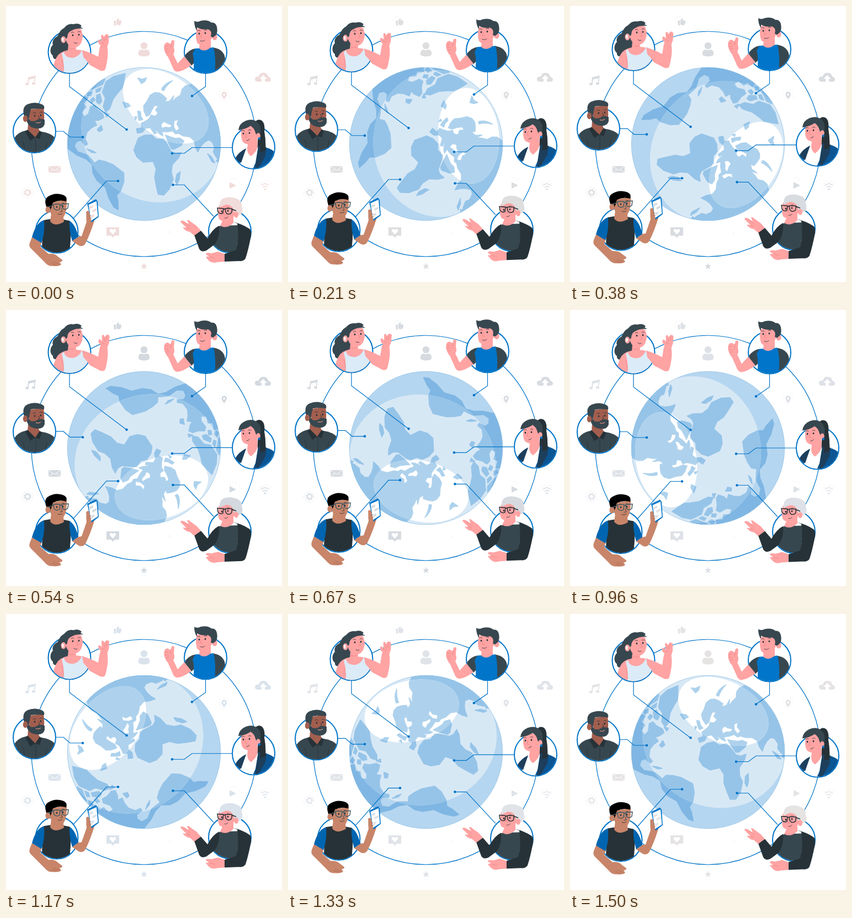
Recreate the animation shown at these times as an HTML page. Size 500 px wide and 500 px high, loop 1540 ms.

```html
<!DOCTYPE html>
<html lang="en">
<head>
<meta charset="utf-8">
<title>Connected world</title>
<style>
html,body{margin:0;width:100%;height:100%;overflow:hidden;background:#fff}
svg{display:block;width:100vw;height:100vh;--tint:#e0e0e0}
.line{fill:none;stroke:#0075c9;stroke-width:1.2}
.ring{fill:#fff;stroke:#0075c9;stroke-width:2}
.blue{fill:#0075c9}
.dark{fill:#37474f}
.ink{fill:#263238}
.pink{fill:#ffa3a3}
.tan{fill:#c8856a}
.brown{fill:#a25e4e}
.tint{fill:var(--tint)}
.thin{fill:none;stroke:#263238;stroke-width:.8;stroke-linecap:round}
.fold{fill:none;stroke:#e98585;stroke-width:.8;stroke-linecap:round}
.white{fill:#fff}
.spark{fill:none;stroke:var(--tint);stroke-width:1.2;stroke-linecap:round;stroke-dasharray:.1 5}
</style>
</head>
<body>
<svg viewBox="0 0 500 500">
<defs>
  <path id="bowl" d="M-37.7 0A37.7 37.7 0 0 0 37.7 0V-75H-37.7Z"/>
  <clipPath id="c1"><use href="#bowl" x="115" y="83.5"/></clipPath>
  <clipPath id="c2"><use href="#bowl" x="361.5" y="83.5"/></clipPath>
  <clipPath id="c3"><use href="#bowl" x="51.5" y="227.5"/></clipPath>
  <clipPath id="c4"><use href="#bowl" x="448.5" y="256.5"/></clipPath>
  <clipPath id="c5"><use href="#bowl" x="92" y="409"/></clipPath>
  <clipPath id="c6"><use href="#bowl" x="405.5" y="408.5"/></clipPath>
  <clipPath id="disc"><circle cx="250" cy="250" r="139"/></clipPath>
  <clipPath id="lit"><ellipse cx="264" cy="231" rx="133" ry="119" transform="rotate(33 264 231)"/></clipPath>
  <clipPath id="shine"><ellipse cx="286" cy="180" rx="87" ry="55" transform="rotate(33 286 180)"/></clipPath>
  <g id="land">
    <path d="M108 262V222L122 190L138 168L144 172L136 182L142 188L134 198L140 206L147 200L150 187L157 184L163 192L173 199L175 206L166 211L158 212L163 220L154 225L146 233L143 246L148 255L144 258L136 249L128 251L124 260L131 270L139 272L149 275L158 284L162 289L170 283L182 285L196 290L206 297L216 304L217 320L212 337L205 345L208 356L209 371L201 367L191 351L184 332L168 320L160 307L158 291L146 282L130 276Z"/>
    <path d="M176 140L190 130L210 124L208 140L206 150L198 160L190 172L185 189L178 196L173 186L176 170L170 160Z"/>
    <path d="M160 166L166 163L170 176L166 182L160 178ZM176 196L184 199L180 204ZM164 228L171 220L174 228L168 232ZM147 264L156 266L164 270L156 270ZM150 156L157 146L166 138L174 136L170 146ZM144 162L152 160L150 167L143 168ZM154 170L158 174L152 180L149 175ZM158 156L168 151L166 158L159 161Z"/>
    <path d="M233 131L241 133L249 130L246 137L240 141ZM208 176L218 178L222 183L213 186ZM236 191L241 192L242 200L246 206L239 208L237 200ZM231 201L235 202L232 207Z"/>
    <path d="M247 190L246 181L252 172L257 161L265 156L273 156L280 160L287 166L284 172L293 170L300 160L297 172L304 164L312 158L314 148L320 141L330 138L345 145L392 165V266L388 274L382 268L376 258L378 250L373 240L366 237L358 243L352 251L348 260L343 250L341 240L332 233L320 232L312 228L306 229L301 224L291 226L281 226L284 234L278 231L270 223L265 218L272 229L268 231L260 220L252 221L246 229L237 231L235 223L245 221L243 213L250 209L257 204L260 197L267 199L273 194L268 187L273 180L266 179L261 188L258 196L252 200Z"/>
    <path d="M277 150Q281 139 296 133Q285 142 281 152ZM366 262L374 268L380 278L374 276ZM382 274L390 266L390 280Z"/>
    <path d="M288 232L298 235L306 237L314 236L322 241L318 249L305 257L300 256L294 245Z"/>
    <path d="M239 240L250 234L263 233L272 240L285 239L291 247L300 261L308 264L318 262L314 272L303 285L302 299L306 311L300 329L290 341L280 340L276 326L272 309L274 294L268 281L250 283L238 274L232 262Z"/>
    <path d="M312 302L318 297L317 311L313 321L310 314Z"/>
  </g>
  <g id="seas" fill="#fff" stroke="none">
    <path d="M280 213Q285 205 289 211L298 214Q297 219 288 217L281 219ZM303 206L309 204L307 211L312 219L307 223L303 216Z"/>
  </g>
  <g id="eyes"><ellipse rx="1.3" ry="1.8" class="ink"/><ellipse cx="11" cy="-1" rx="1.3" ry="1.8" class="ink"/><path class="thin" d="M-3-5Q0-7 2-5M9-6Q11-8 14-6"/></g>
</defs>
<rect width="500" height="500" fill="#fff"/>

<g class="tint">
  <path d="M195 27L199 26V35L196 36ZM200 26L203 22Q205 22 204 26L208 26Q210 28 208 33L206 35L200 34Z"/>
  <circle cx="250" cy="72" r="6.3"/><path d="M240 84Q241 79 246 79Q250 81 254 79Q259 79 260 84V89Q250 94 240 89Z"/>
  <path d="M40 129L54 126L52 140H50.500L51.700 131L42 133L40.500 142H39Z"/><ellipse cx="38" cy="141.500" rx="3" ry="2.200"/><ellipse cx="50" cy="140.500" rx="3" ry="2.200"/>
  <path d="M455 137Q450 136 451 131Q453 127 458 128Q459 121 466 121Q474 121 475 128Q480 129 480 134Q479 137 476 137H469V132H473L466 125L459 132H463V137Z"/>
  <path fill-rule="evenodd" d="M395 169Q390 162 390.500 160A4.700 4.700 0 0 1 400 160Q400 163 395 169ZM395.200 158.500A2 2 0 1 0 395.300 158.500Z"/>
  <path d="M77 290H99V302H77Z"/>
  <path d="M405 319L417 325L405 331Z"/>
  <path d="M182 401H205V416H197L193.500 420L190 416H182Z"/>
  <path d="M250 465.500L251.700 469.500L256 469.800L252.700 472.600L253.700 477L250 474.600L246.300 477L247.300 472.600L244 469.800L248.300 469.500Z"/>
  <circle cx="469" cy="332" r="1.800"/>
  <circle cx="295" cy="409" r=".7"/><circle cx="297" cy="412" r=".8"/>
</g>
<path d="M77 290L88 298L99 290M77 302L85 296M99 302L91 296" fill="none" stroke="#fff"/>
<path class="white" d="M193.500 414L188 408Q187 404 190.500 404Q193 404 193.500 406Q194 404 196.500 404Q200 404 199 408Z"/>
<g fill="none" stroke="var(--tint)">
  <circle cx="39" cy="338" r="4" stroke-width="2"/><circle cx="39" cy="338" r="6" stroke-width="1.800" stroke-dasharray="2.350"/>
  <path d="M464.500 328.500Q469 325 473.500 328.500M461.500 325Q469 319 476.500 325" stroke-width="1.300"/>
</g>
<g class="spark">
  <path d="M29 338A10 10 0 0 1 49 338A10 10 0 0 1 29 338M387 155Q384 168 398 173M399 152Q407 158 405 167M458 326Q460 318 469 317Q479 318 480 326M406 311Q412 311 417 314M423 320V325M192 25Q193 18 200 20M247 481H256M35 130V125M452 123L459 118M88 287L98 286"/>
</g>

<circle class="line" cx="250" cy="250" r="204"/>

<g id="globe" clip-path="url(#disc)" stroke-width="1.6" stroke-linejoin="round">
  <circle cx="250" cy="250" r="139" fill="#b5d6f0"/>
  <use href="#land" fill="#7fb6e3" stroke="#7fb6e3"/>
  <g clip-path="url(#lit)">
    <rect x="100" y="100" width="300" height="300" fill="#d7e8f5"/>
    <use href="#land" fill="#96c4e8" stroke="#96c4e8"/>
  </g>
  <g clip-path="url(#shine)">
    <rect x="100" y="100" width="300" height="300" fill="#fff"/>
    <use href="#land" fill="#aed2ed" stroke="#aed2ed"/>
    <use href="#seas"/>
  </g>
</g>
<circle cx="250" cy="250" r="138.700" fill="none" stroke="#8fc0e6" stroke-width=".7"/>

<g id="float">
  <path class="line" d="M115 121V146L218.500 224M361.500 121V146L337 163M89 227H104L116 237.500H139M411 256.500H337L323 267H301M122 385L182 317H203M376 381L323 324H302.500"/>
  <g class="blue"><circle cx="218.500" cy="223.800" r="2.300"/><circle cx="337" cy="163" r="2.300"/><circle cx="139" cy="237.500" r="2.300"/><circle cx="301" cy="267" r="2.300"/><circle cx="203" cy="317" r="2.300"/><circle cx="302.500" cy="324" r="2.300"/></g>
  <g class="ring"><circle cx="115" cy="83.500" r="38.500"/><circle cx="361.500" cy="83.500" r="38.500"/><circle cx="51.500" cy="227.500" r="38.500"/><circle cx="448.500" cy="256.500" r="38.500"/><circle cx="92" cy="409" r="38.500"/><circle cx="405.500" cy="408.500" r="38.500"/></g>

  <!-- woman waving -->
  <path class="dark" d="M106 40C98 42 96 51 93 55C86 58 83 65 85 70C79 76 79 86 85 90C84 96 91 98 94 95L112 88L122 60Z"/>
  <g clip-path="url(#c1)">
    <path class="pink" d="M113 70L112 80Q96 83 91 94Q84 108 84 124H150V92Q143 79 127 79V70Z"/>
    <path d="M101 86L105 83Q107 94 121 94Q133 92 138 79L143 82Q144 88 154 93V124H103Q107 105 101 86Z" fill="#dbebf7"/>
  </g>
  <path class="pink" d="M138 80Q150 83 167 92L170 74L183 73Q187 88 180 114Q178 119 171 117L152 107Q146 98 140 92Z"/>
  <g id="hand" class="pink">
    <path d="M170 77L171 71Q165 66 167 61L170 61L173 64L172 54Q173 51 176 53L177 56L180 52Q182 50 184 52L186 53L186 66L183 76Z"/>
    <path class="fold" d="M177 58L178 64M181 55V62M173 65Q175 69 178 68"/>
  </g>
  <path class="pink" d="M107 48Q106 60 112 69Q119 77 129 74Q139 69 139 52L136 42Q121 37 109 43Z"/>
  <path class="dark" d="M105 58Q99 45 106 39Q113 31 122 33Q132 30 137 36L135 38L140 41Q127 40 120 44Q111 47 111 57L108 60Z"/>
  <ellipse class="pink" cx="104" cy="61" rx="4.500" ry="6.200"/><path d="M101 58Q103 56 105 59L104 65Q101 65 101 58Z" fill="#f6f6f6"/>
  <use href="#eyes" x="121" y="53"/><path class="fold" d="M128 53L131 59L127 60"/><path class="thin" d="M123 66Q126 69 129 67"/>
  <path class="fold" d="M114 77Q119 79 124 77M101 98Q105 106 104 118"/>

  <!-- man, thumb up -->
  <g clip-path="url(#c2)">
    <path class="dark" d="M343 77Q331 79 322 92L336 108L344 100ZM374 75Q391 77 396 90L402 124H372Z"/>
    <path class="blue" d="M343 77L376 75Q381 95 378 124H339Q342 98 338 86Z"/>
    <path class="pink" d="M351 66L350 77Q359 85 371 75V58Z"/>
  </g>
  <path class="pink" d="M323 91L336 107Q321 118 311 119Q304 119 301 109L292 89L302 85L311 104Z"/>
  <path class="pink" d="M292 91Q284 79 287 70Q289 66 293 66L298 69L300 63Q303 60 305 64L304 75Q307 83 302 89Z"/>
  <path class="fold" d="M288 73L293 73M288 78L294 78M290 83L295 82M299 69L298 76"/>
  <path class="pink" d="M346 41Q342 54 346 66Q351 73 362 70Q373 64 376 49L369 38Z"/>
  <ellipse class="pink" cx="378" cy="56" rx="4.700" ry="6"/>
  <path class="dark" d="M346 45Q341 38 341 27Q347 30 352 27Q365 24 372 30Q380 29 382 38Q384 48 380 53L375 57L371 55Q374 45 366 42Q356 44 346 39Z"/>
  <use href="#eyes" x="350" y="50"/><path class="fold" d="M354 50L352 56L356 57"/><path class="thin" d="M352 63Q357 65 360 62"/>

  <!-- bearded man -->
  <g clip-path="url(#c3)">
    <path class="dark" d="M38 225Q19 229 14 242V270H90V241Q84 230 61 227Z"/>
    <path class="brown" d="M40 214L39 227Q48 238 56 238L62 228L56 216Z"/>
    <path class="ink" d="M39 224L53 238L44 244L35 228ZM61 226L53 238L61 241L65 229Z"/><path class="thin" d="M54 239V266M30 245Q34 252 33 263M74 247L71 264"/>
  </g>
  <path class="brown" d="M42 188Q39 207 47 218Q56 224 67 217Q71 203 68 184Z"/>
  <path class="dark" d="M37 204Q43 204 44 208Q52 210 57 206Q64 203 70 206V214Q67 223 56 222Q42 221 38 210Z"/>
  <path class="dark" d="M33 200Q28 183 39 178Q51 173 62 177Q71 179 69 187Q57 185 45 187L43 195L41 206L36 205Z"/>
  <ellipse class="brown" cx="35" cy="204" rx="4.200" ry="6"/>
  <use href="#eyes" x="52" y="199"/><path class="thin" d="M59 199L61 204L58 205"/><path d="M54 211Q59 213 63 210" fill="none" stroke="#d88b78" stroke-width="1.300"/>

  <!-- woman with ponytail -->
  <path class="ink" d="M450 211Q457 203 464 208Q470 214 468 229Q471 246 470 262L455 268L457 225Z"/>
  <g clip-path="url(#c4)">
    <path class="white" d="M435 257L420 285L424 298H452L462 256Z"/>
    <path d="M435 258Q417 267 413 282L422 298H428L424 285ZM457 254Q481 256 490 268L480 298H446L452 284Z" fill="#0b5593"/>
    <path d="M435 258L426 284L416 276Q422 264 435 258ZM457 254L451 296H456L470 272L472 256Z" fill="#1d3f5c"/>
    <path class="pink" d="M439 244L437 258Q437 268 444 272Q454 264 456 255L455 238Z"/>
    <path class="ink" d="M455 230L468 228Q471 246 470 262L460 265Q463 250 455 230Z"/>
  </g>
  <path class="pink" d="M427 222Q424 238 429 246Q436 253 446 249Q456 244 459 229L452 215Z"/>
  <path class="dark" d="M421 225Q422 213 434 208Q447 203 456 211Q463 217 461 231L456 239L452 230Q450 221 443 217Q435 223 421 225Z"/>
  <ellipse class="pink" cx="457" cy="235" rx="3.800" ry="5"/><circle class="blue" cx="459" cy="240" r="2.200"/>
  <use href="#eyes" x="430" y="231"/><path class="fold" d="M435 230L433 237L437 238"/><path class="thin" d="M436 244Q440 244 441 241"/>

  <!-- man with phone -->
  <g clip-path="url(#c5)">
    <path class="ink" d="M68 388Q91 383 115 389Q119 410 116 436L118 450H64Q67 420 64 406Z"/>
    <path class="tan" d="M82 376L80 390Q88 401 105 391L103 374Z"/>
  </g>
  <path d="M69 388Q54 392 47 419L64 430Q71 411 69 388ZM115 389Q126 396 131 418L120 426Q114 407 115 389Z" fill="#0065b0"/>
  <path class="tan" d="M47 419L64 429L62 436L77 449Q89 448 94 454L102 460Q103 463 97 464L100 468Q97 472 85 471Q76 472 70 464L45 439Q41 435 43 429Z"/>
  <path class="tan" d="M120 426L131 418L137 417L146 391Q144 377 148 371L155 373L160 389Q153 412 144 430Q140 437 132 434Z"/>
  <path class="blue" d="M147 358L163 350L166 354L168 382L155 392Z"/><path class="white" d="M149.500 360L164 353.500L166.500 381L154 389Z"/>
  <g class="tint"><path d="M151 364L158 361V365L152 368ZM156 370L164 366V370L157 374ZM154 380L160 377V381L155 384Z"/></g>
  <path class="tan" d="M145 373Q148 369 151 374L154 389Q151 394 147 391Z"/>
  <path d="M85 463L96 468M82 466L92 470M150 380L154 380M150 385L155 384" fill="none" stroke="#a86850" stroke-width=".8"/>
  <path class="tan" d="M80 356Q78 373 84 382Q91 389 103 384Q111 374 110 351Z"/>
  <path d="M74 366Q68 351 75 346Q88 337 103 342Q112 345 109 354Q97 350 85 356L82 366L79 372Z" fill="#000"/>
  <ellipse class="tan" cx="76" cy="369" rx="4.500" ry="6"/>
  <use href="#eyes" x="92" y="364"/>
  <path d="M86 359H98L97 368Q92 372 87 367ZM101 359L113 358L112 366Q107 371 102 366ZM98 361H101M76 364L86 361" fill="none" stroke="#455a64" stroke-width="1.500"/>
  <path class="thin" d="M100 367L102 372L98 373M94 377Q98 379 102 376"/>

  <!-- woman with glasses -->
  <g clip-path="url(#c6)">
    <path class="dark" d="M389 398Q375 402 372 418L376 450H417L424 397Z"/>
    <path class="pink" d="M394 385L388 398Q400 405 412 393V380Z"/>
  </g>
  <path class="ink" d="M386 398Q374 404 365 421L353 407L341 415L350 440Q354 447 363 443L378 432Q388 418 386 398ZM411 391Q428 395 440 403Q445 405 444 416Q439 442 434 457Q431 463 422 462L396 463V449L417 442Q423 420 419 394Z"/>
  <path class="pink" d="M353 407L341 416L333 409Q326 409 320 401Q323 401 327 402L316 391Q317 387 322 390L331 395L328 388Q330 386 335 391L345 398Z"/>
  <path class="pink" d="M396 449V463L383 464Q374 467 368 462L362 455Q363 453 370 455L362 450Q362 446 372 448L384 445Z"/>
  <path class="fold" d="M322 390L333 400M327 402L333 404M367 454L378 457"/>
  <path class="pink" d="M386 361Q382 377 386 386Q394 393 406 388Q416 382 416 366L405 356Z"/>
  <path class="tint" d="M387 365Q386 351 395 348Q406 344 418 349Q428 353 427 362Q431 374 424 378L415 379L412 368Q407 359 398 360Z"/>
  <ellipse class="pink" cx="417" cy="378" rx="4" ry="5.500"/>
  <use href="#eyes" x="391" y="372"/>
  <path d="M383 366L394 367L393 375Q388 378 384 373ZM397 367L409 367Q410 374 407 376Q400 379 398 373ZM394 368H397M409 368L417 371" fill="none" stroke="#263238" stroke-width="1.500"/>
  <path class="fold" d="M396 371L394 378L398 378"/><path class="thin" d="M396 384Q400 385 402 382"/>
</g>
</svg>
<script>
const LOOP = 1540, LOW = 1500, LIFT = 10, TILT = 2.5;
const $ = id => document.getElementById(id);
const svg = document.querySelector("svg");
const tints = [[0, 239, 220, 219], [210, 222, 222, 222], [540, 211, 217, 223], [790, 218, 221, 225],
  [960, 222, 225, 231], [1170, 218, 227, 236], [1500, 230, 227, 227], [LOOP, 239, 220, 219]];

function tintAt(t) {
  const i = tints.findIndex(k => k[0] > t);
  const a = tints[i - 1], b = tints[i], p = (t - a[0]) / (b[0] - a[0]);
  return `rgb(${[1, 2, 3].map(n => Math.round(a[n] + (b[n] - a[n]) * p))})`;
}

// Triangle wave: 0 at LOW, 1 half a loop later
function wave(t) {
  const p = ((t - LOW + LOOP) % LOOP) / LOOP;
  return 1 - Math.abs(1 - 2 * p);
}

function draw(now) {
  const t = now % LOOP, up = wave(t);
  $("globe").setAttribute("transform", `rotate(${TILT + t / LOOP * 360} 250 250)`);
  $("float").setAttribute("transform", `translate(0 ${LIFT * (wave(0) - up)})`);
  $("hand").setAttribute("transform", `rotate(${up * 6} 177 75)`);
  svg.style.setProperty("--tint", tintAt(t));
}

const start = performance.now();
function tick() {
  draw(performance.now() - start);
  requestAnimationFrame(tick);
}
tick();
</script>
</body>
</html>
```
